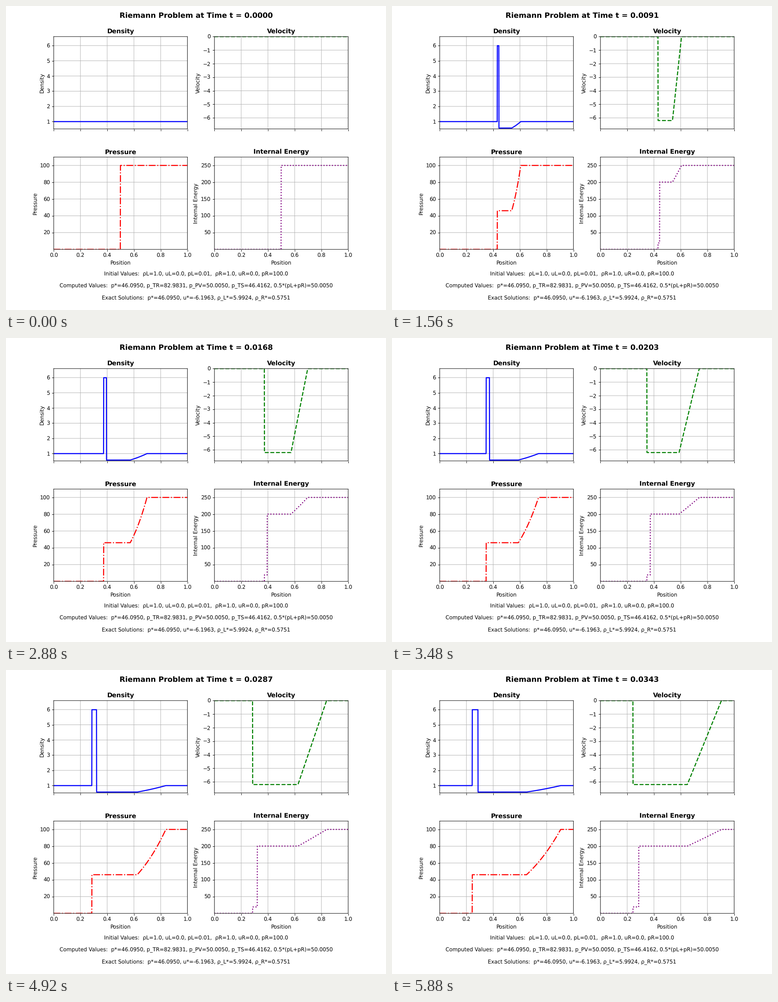
Animation of 837x669 px, one loop 6000 ms. Source, as a matplotlib script:

```python
import numpy as np
import matplotlib.pyplot as plt
from matplotlib.animation import FuncAnimation
from matplotlib.transforms import Affine2D

WIDTH, HEIGHT, DPI = 837, 669, 83.7
FRAMES, INTERVAL, T_END = 50, 120, 0.035

GAMMA, X0 = 1.4, 0.5
RHO_L, U_L, P_L = 1.0, 0.0, 0.01
RHO_R, U_R, P_R = 1.0, 0.0, 100.0
P_STAR, U_STAR = 46.0950, -6.1963

# Left shock and right rarefaction
G = (GAMMA - 1) / (GAMMA + 1)
RATIO = P_STAR / P_L
RHO_STAR_L = RHO_L * (RATIO + G) / (G * RATIO + 1)
RHO_STAR_R = RHO_R * (P_STAR / P_R) ** (1 / GAMMA)
SHOCK = U_STAR * RHO_STAR_L / (RHO_STAR_L - RHO_L)
C_R = np.sqrt(GAMMA * P_R / RHO_R)
C_STAR = np.sqrt(GAMMA * P_STAR / RHO_STAR_R)

x = np.linspace(0, 1, 1000)


def energy(p, rho):
    return p / ((GAMMA - 1) * rho)


def solve(t):
    """Exact density, velocity, pressure and internal energy at time t."""
    xi = (x - X0) / max(t, 1e-12)
    c = np.clip(2 / (GAMMA + 1) * C_R + G * (xi - U_R), C_STAR, C_R)
    rho = RHO_R * (c / C_R) ** (2 / (GAMMA - 1))
    u = U_R + 2 / (GAMMA - 1) * (c - C_R)
    p = P_R * (c / C_R) ** (2 * GAMMA / (GAMMA - 1))
    rho = np.where(xi < U_STAR, RHO_STAR_L, rho)
    ahead = xi < SHOCK
    rho = np.where(ahead, RHO_L, rho)
    u = np.where(ahead, U_L, u)
    p = np.where(ahead, P_L, p)
    return rho, u, p, energy(p, rho)


# Soft, unsnapped edges and unhinted glyphs
plt.rcParams.update({"font.family": "DejaVu Sans", "path.snap": False,
                     "text.hinting": "none"})

# The small margin keeps the pixel size from being truncated
fig, axes = plt.subplots(2, 2, sharex=True, dpi=DPI,
                         figsize=((WIDTH + 0.01) / DPI, (HEIGHT + 0.01) / DPI))
# Panel edges in units of a 1000 x 800 layout
fig.subplots_adjust(left=125.5 / 1000, right=900.5 / 1000,
                    top=1 - 80.5 / 800, bottom=1 - 640.5 / 800,
                    wspace=71 / 352, hspace=74 / 243)

panels = [
    ("Density", "blue", "-", 0.9 * RHO_STAR_R, 1.1 * RHO_STAR_L),
    ("Velocity", "green", "--", 1.1 * U_STAR, 0),
    ("Pressure", "red", "-.", 0.9 * P_L, 1.1 * P_R),
    ("Internal Energy", "purple", ":", 0.9 * energy(P_L, RHO_L),
     1.1 * energy(P_R, RHO_R)),
]
# Curves start half a layout unit left of the panel edge's centre
half_unit = Affine2D().translate(-0.5 * WIDTH / 1000, 0)
lines = []
for ax, (name, color, style, low, high) in zip(axes.flat, panels):
    lines += ax.plot([], [], color=color, linestyle=style, linewidth=2,
                     transform=ax.transData + half_unit)
    ax.set_title(name, fontsize=12, fontweight="bold")
    ax.set_ylabel(name)
    ax.set_xlim(0, 1)
    ax.set_ylim(low, high)
    ax.grid(True)
for ax in axes[1]:
    ax.set_xlabel("Position")

heading = fig.suptitle("", fontsize=14, fontweight="bold")
mean_p = 0.5 * (P_L + P_R)
notes = [
    f"Initial Values:  ρL={RHO_L}, uL={U_L}, pL={P_L},  "
    f"ρR={RHO_R}, uR={U_R}, pR={P_R}",
    f"Computed Values:  p*={P_STAR:.4f}, p_TR=82.9831, p_PV={mean_p:.4f}, "
    f"p_TS=46.4162, 0.5*(pL+pR)={mean_p:.4f}",
    f"Exact Solutions:  p*={P_STAR:.4f}, u*={U_STAR:.4f}, "
    f"ρ_L*={RHO_STAR_L:.4f}, ρ_R*={RHO_STAR_R:.4f}",
]
for y, note in zip((0.12, 0.08, 0.04), notes):
    fig.text(0.5, y, note, ha="center", va="center", fontsize=10)


def update(frame):
    t = T_END * frame / FRAMES
    for line, values in zip(lines, solve(t)):
        line.set_data(x, values)
    heading.set_text(f"Riemann Problem at Time t = {t:.4f}")
    return [*lines, heading]


anim = FuncAnimation(fig, update, frames=FRAMES, interval=INTERVAL,
                     repeat=True, repeat_delay=0, blit=False)
plt.show()
```
